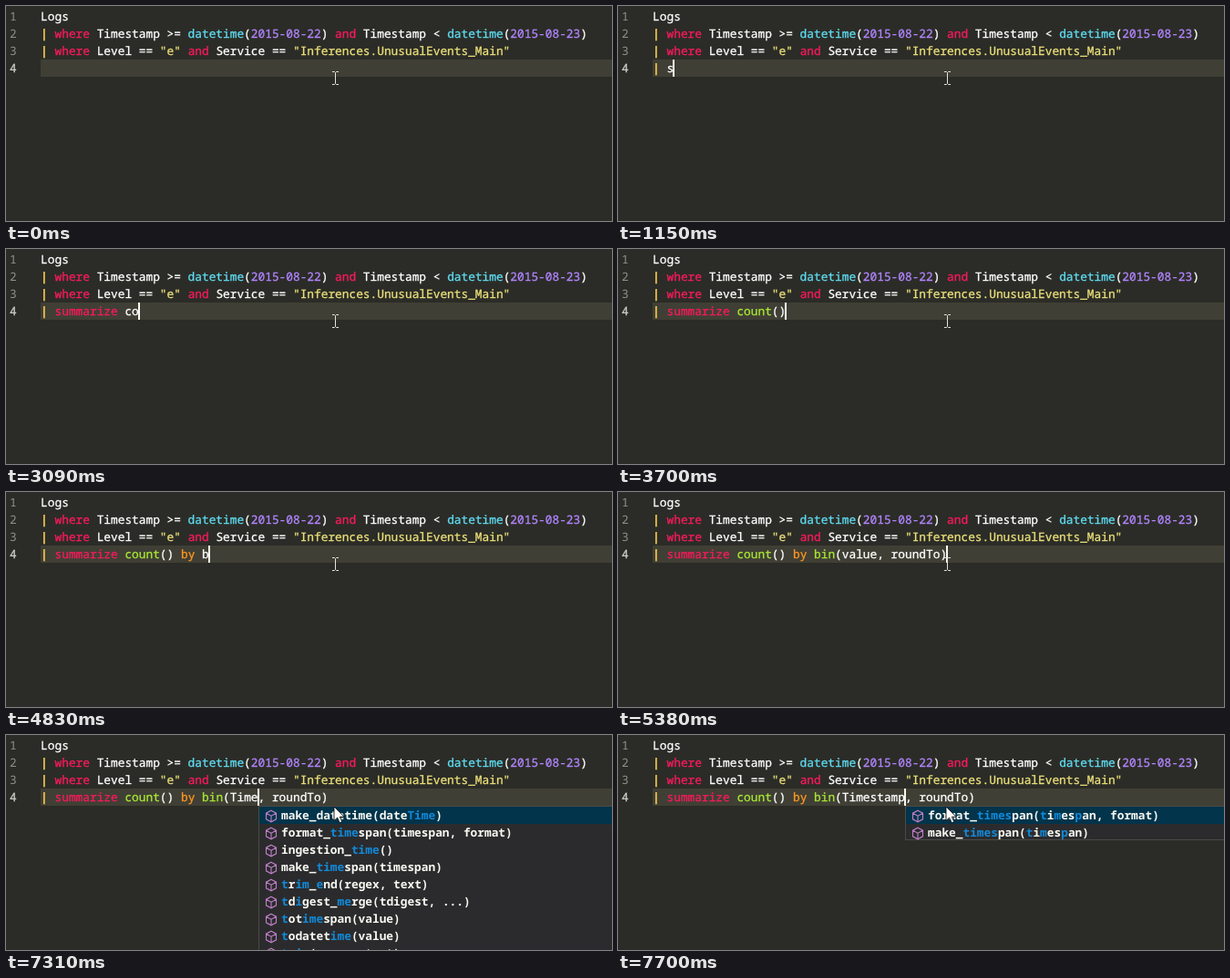
An HTML page for the animation above (8000 ms loop, 665 by 237 pixels).

```html
<!DOCTYPE html>
<html lang="en">
<head>
<meta charset="utf-8">
<title>Query editor</title>
<style>
  html, body { margin: 0; width: 100%; height: 100%; overflow: hidden; background: #2b2c27; }
  svg { display: block; }
  text {
    font: 12.828px "Noto Sans Mono", "DejaVu Sans Mono", monospace;
    text-rendering: geometricPrecision;
    white-space: pre;
    color: #fff;
  }
  text, tspan { fill: currentColor; stroke: currentColor; stroke-width: .3; }
  .keyword { color: #f91a5c; }
  .type { color: #5fdcf2; }
  .date { color: #b285ff; }
  .string { color: #ece07a; }
  .pipe { color: #f7cd50; font-weight: bold; }
  .call { color: #a9e834; }
  .by { color: #fd971f; }
  .number { color: #90908a; stroke: none; }
  .active { color: #d0d0ca; }
  .label { color: #f8f8f2; font-weight: 600; stroke: none; }
  .match { color: #1289d8; stroke: none; }
  .icon { fill: none; stroke: #c080c8; stroke-width: 1.1; }
  .icon.word { stroke: #c8c8c4; }
</style>
</head>
<body>
<svg width="665" height="237" viewBox="0 0 665 237">
  <g id="scene"></g>
  <g id="code"></g>
  <g id="popup"></g>
  <path id="beam" fill="none" stroke="#e4e4e0"
    d="M358 72.5h2.5l1 1 1-1h2.5M361.5 73.5v12M358 86.5h2.5l1-1 1 1h2.5"/>
  <path id="arrow" fill="#fff" stroke="#111" stroke-width=".9"
    d="M360 79v15.5l3.6-3.4 2.6 5.6 2.6-1.1-2.5-5.4h5z"/>
</svg>
<script>
const LOOP = 8000, CHAR = 7.697, LEFT = 38.1, ROW = 19, TOP = 2, LINE = 59, LIST_WIDTH = 430;

const query = [
  'Logs',
  '| where Timestamp >= datetime(2015-08-22) and Timestamp < datetime(2015-08-23)',
  '| where Level == "e" and Service == "Inferences.UnusualEvents_Main"'
];

// Braces mark the matched letters.
const timeList = [
  'make_datetime(date{Time})', 'format_{time}span(timespan, format)', 'ingestion_{time}()',
  'make_{time}span(timespan)', '{t}r{im}_{e}nd(regex, text)', '{t}d{i}gest_{me}rge(tdigest, ...)',
  '{t}ot{ime}span(value)', '{t}odatet{ime}(value)', '{t}r{im}(regex, text)'
];
const spanList = [
  'format_{times}pan({t}i{m}es{p}an, format)',
  'make_{times}pan({t}i{m}es{p}an)'
];
const countList = [
  '{cou}nt()', '{cou}ntif(predicate)', '{cou}ntof(text, search, kind)', 'd{cou}nt(expr, accuracy)',
  'd{cou}ntif(expr, predicate)', 'd{cou}nt_hll(hll)', 'row_{cou}nt()', 'bit_{cou}nt(value)', 'day_{cou}nt()'
];
const binList = [
  '{bi}n(value, roundTo)', '{bi}n_at(value, binSize, fixedPoint)', '{bi}n_auto(value)', '{bi}nary_and(a, b)',
  '{bi}nary_not(value)', '{bi}nary_or(a, b)', '{bi}nary_shift_left(value, shift)',
  '{bi}nary_shift_right(value, shift)', '{bi}nary_xor(a, b)'
];

const steps = [];
const step = (time, text, options = {}) => steps.push({ time, text, caret: text.length, ...options });
const word = typed => ({ list: [`{${typed}}${'summarize'.slice(typed.length)}`], word: true });

step(0, '', { caret: -1 });
step(130, '');
step(600, '', { caret: -1 });
step(670, '|');
step(900, '| ');
step(1150, '| s');
step(1220, '| su', word('su'));
step(1460, '| sum', word('sum'));
step(1620, '| summ', word('summ'));
step(1680, '| summa', word('summa'));
const sum = '| summarize';
step(2150, sum);
step(2630, sum, { caret: -1 });
step(2700, sum + ' ');
step(3020, sum + ' c');
step(3090, sum + ' co');
step(3160, sum + ' cou');
step(3240, sum + ' cou', { list: countList });
const count = sum + ' count()';
step(3700, count);
step(3780, count, { brackets: [17, 18] });
step(4260, count, { caret: -1, brackets: [17, 18] });
step(4330, count + ' ');
step(4400, count + ' b');
step(4570, count + ' by');
step(4630, count + ' by ');
step(4830, count + ' by b');
step(5000, count + ' by bi');
step(5070, count + ' by bi', { list: binList });
const bin = count + ' by bin(', call = bin + 'value, roundTo)';
step(5380, call);
step(5460, call, { brackets: [26, 41] });
step(5920, call, { caret: 41, brackets: [26, 41] });
step(6170, call, { caret: 34 });
step(6230, call, { caret: 33 });
step(6300, call, { caret: 32 });
step(6680, call, { caret: 27, selected: [27, 32] });
[...'Timestamp'].forEach((_, i) => {
  const typed = bin + 'Timestamp'.slice(0, i + 1);
  const list = i < 1 ? null
    : i < 4 ? timeList
    : i < 5 ? [...spanList.map(s => s.replace(/\(.*\)/, m => m.replace(/[{}]/g, ''))), '{t}ot{imes}pan(value)']
    : spanList;
  step(Math.round((7080 + i * 77.5) / 10) * 10, typed + ', roundTo)', { caret: typed.length, list });
});

const tokens = [
  ['string', /^"[^"]*"/], ['date', /^\d{4}-\d\d-\d\d/], ['pipe', /^\|/],
  ['keyword', /^(where|and|summarize)\b/], ['type', /^datetime\b/],
  ['call', /^(count|bin)(?=\()/], ['by', /^by\b/], ['', /^(\w+|\s+|.)/]
];
const escapeText = s => s.replace(/&/g, '&amp;').replace(/</g, '&lt;');
const span = (name, s) => name ? `<tspan class="${name}">${escapeText(s)}</tspan>` : escapeText(s);
const textAt = (x, top, body, name = '') => `<text class="${name}" x="${x}" y="${top + 14}">${body}</text>`;
const rect = (x, y, w, h, look) => `<rect x="${x}" y="${y}" width="${w}" height="${h}" ${look}/>`;
const columnX = column => LEFT + column * CHAR;
const caretX = column => Math.max(38, Math.floor(37.4 + column * CHAR));

function colour(line) {
  let out = '';
  while (line) {
    const [name, rule] = tokens.find(([, r]) => r.test(line));
    const part = line.match(rule)[0];
    out += span(name, part);
    line = line.slice(part.length);
  }
  return out;
}

const marked = label => label.split(/[{}]/).map((s, i) => span(i % 2 ? 'match' : '', s)).join('');

function icon(x, y, isWord) {
  const shape = isWord
    ? 'M-7-4.5h6M1-4.5h4M-7-1.5h4M-1-1.5h8M-7 1.5h8M3 1.5h3M-7 4.5h5M0 4.5h7'
    : 'M0-6.3L5.5-3.3V3.3L0 6.3-5.5 3.3V-3.3ZM-5.5-3.3L0-.3 5.5-3.3M0-.3V6.3';
  return `<path class="icon ${isWord ? 'word' : ''}" transform="translate(${x} ${y})" d="${shape}"/>`;
}

function popup({ list, caret, word }) {
  if (!list) return '';
  const x = Math.round(columnX(caret)), y = LINE + ROW, height = list.length * ROW;
  const rowY = i => y + 1 + i * ROW;
  return rect(x, y, LIST_WIDTH, height, 'fill="#2b2b2d"')
    + rect(x, rowY(0), LIST_WIDTH, Math.min(ROW, height - 1), 'fill="#02344b"')
    + rect(x + .5, y + .5, LIST_WIDTH - 1, height - 1, 'fill="none" stroke="#4a4b45"')
    + list.map((label, i) => icon(x + 14, rowY(i) + 10.5, word)
      + textAt(x + 25, rowY(i), marked(label), 'label')).join('');
}

function editLine({ text, caret, brackets = [], selected }) {
  let out = selected
    ? rect(columnX(selected[0]), LINE, (selected[1] - selected[0]) * CHAR, ROW, 'fill="#5a5b52"')
    : rect(38, LINE, 627, ROW, 'fill="#403f35"');
  for (const column of brackets) {
    out += rect(Math.floor(columnX(column)) + .5, LINE + .5, 7, ROW - 1, 'fill="none" stroke="#888"');
  }
  out += textAt(LEFT, LINE, colour(text));
  if (caret >= 0) out += rect(caretX(caret), LINE, 2, ROW, 'fill="#f8f8f0"');
  return out;
}

const byId = id => document.getElementById(id);
byId('scene').innerHTML = query.map((line, i) => textAt(LEFT, TOP + i * ROW, colour(line))).join('')
  + [1, 2, 3, 4].map(n => textAt(4, TOP + (n - 1) * ROW, n, n === 4 ? 'active' : 'number')).join('');

let shown;
function draw(now) {
  const time = now % LOOP;
  const current = steps.findLast(s => s.time <= time);
  if (current !== shown) {
    shown = current;
    byId('code').innerHTML = editLine(current);
    byId('popup').innerHTML = popup(current);
    byId('arrow').style.display = current.list ? '' : 'none';
    byId('beam').style.display = current.list ? 'none' : '';
  }
}

const start = performance.now();
function tick() {
  draw(performance.now() - start);
  requestAnimationFrame(tick);
}
tick();
</script>
</body>
</html>
```
